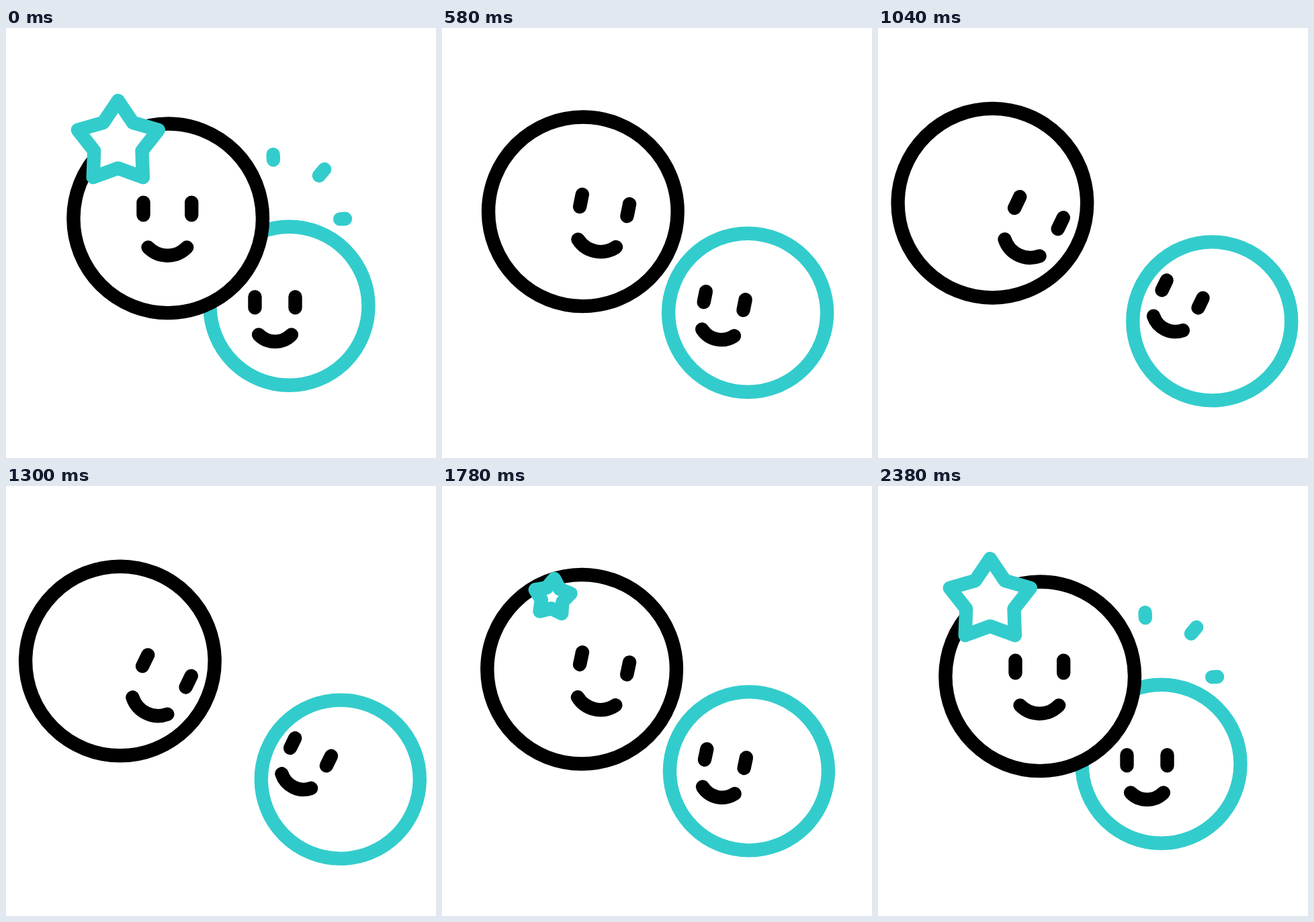
Recreate the animation shown at these times as an HTML page. Size 640 px wide and 640 px high, loop 2400 ms.

```html
<!DOCTYPE html>
<html lang="en">
<head>
<meta charset="utf-8">
<title>Two smiling circles</title>
<style>
  html, body { margin: 0; width: 100%; height: 100%; overflow: hidden; background: #fff; }
  svg { display: block; width: 100%; height: 100%; }
  .line { fill: none; stroke-width: 20.4; stroke-linecap: round; stroke-linejoin: round; }
  .black { stroke: #000; }
  .teal { stroke: #33cccc; }
  .solid { fill: #fff; }
</style>
</head>
<body>
<svg viewBox="0 0 640 640">
  <circle id="smallRing" class="line solid teal" r="118"/>
  <path id="smallFace" class="line black"/>
  <circle id="bigRing" class="line solid black" r="140.8"/>
  <path id="bigFace" class="line black"/>
  <path id="star" class="line solid teal"/>
  <path id="sparks" class="line teal"/>
</svg>
<script>
const LOOP = 2400;
const RAD = Math.PI / 180;
const el = id => document.getElementById(id);
const mix = (a, b, k) => a + (b - a) * k;

// Symmetric cubic-bezier(.75, 0, .25, 1), solved by bisection.
function ease(x) {
  if (x <= 0) return 0;
  if (x >= 1) return 1;
  let lo = 0, hi = 1, s = 0.5;
  for (let i = 0; i < 24; i++) {
    s = (lo + hi) / 2;
    const r = 1 - s;
    const bx = 2.25 * s * r * r + 0.75 * s * s * r + s * s * s;
    if (bx < x) lo = s; else hi = s;
  }
  return s * s * (3 - 2 * s);
}
const span = (t, from, to) => ease((t - from) / (to - from));

// Eyes and mouth around the point midway between the eyes.
function face(gap, eye, drop, half, sag) {
  const r = (half * half + sag * sag) / (2 * sag);
  const eyeAt = x => `M${x} ${-eye}V${eye}`;
  return eyeAt(-gap) + eyeAt(gap) + `M${-half} ${drop}A${r} ${r} 0 0 0 ${half} ${drop}`;
}
el('bigFace').setAttribute('d', face(35.85, 9.3, 57.5, 28.8, 12.2));
el('smallFace').setAttribute('d', face(30, 8.1, 48.2, 24.4, 10.2));

// Star path scaled and turned about its box centre; the line weight stays.
function starPath(scale, turn) {
  const pts = [];
  const c = Math.cos(turn), s = Math.sin(turn);
  for (let i = 0; i < 10; i++) {
    const r = i % 2 ? 37.5 : 63.1;
    const a = i * 36 * RAD;
    const x = r * Math.sin(a) * scale;
    const y = (6 - r * Math.cos(a)) * scale;
    pts.push((166.8 + x * c - y * s).toFixed(2) + ' ' + (165.2 + x * s + y * c).toFixed(2));
  }
  return 'M' + pts.join('L') + 'Z';
}

const sparks = [
  [397.9, 196.2, 397.6, 188.3],
  [465.9, 219.8, 474.1, 210.2],
  [497.2, 284.4, 505, 284]
];
const sparkPath = (a, b) => sparks.map(([x1, y1, x2, y2]) =>
  `M${mix(x1, x2, a)} ${mix(y1, y2, a)}L${mix(x1, x2, b)} ${mix(y1, y2, b)}`).join('');

function place(id, x, y, turn = 0) {
  el(id).setAttribute('transform', `translate(${x} ${y}) rotate(${turn})`);
}

function draw(t) {
  const p = t < 1200 ? span(t, 0, 1200) : 1 - span(t, 1200, 2340);
  const q = p * p;
  place('bigRing', 241.2 - 71.7 * p, 283.3 - 22.9 * p);
  place('smallRing', 421.5 + 76.7 * p, 413.8 + 22.9 * p);
  place('bigFace', 240.35 + 7.8 * p - 8.8 * q, 269 - 25.7 * p + 32.3 * q, 26 * p);
  place('smallFace', 400.5 + 40.3 * p + 13.1 * q, 408.3 + 0.8 * p - 13.4 * q, 26.3 * p);

  const scale = t < 1200 ? 1 - span(t, 0, 550) : span(t, 1480, 2100);
  const turn = 360 * (t < 1200 ? span(t, 0, 1200) : span(t, 1400, 2340));
  el('star').setAttribute('d', scale > 0.005 ? starPath(scale, turn * RAD) : '');

  const gone = span(t, 0, 200), back = span(t, 2100, 2340);
  el('sparks').setAttribute('d',
    gone < 1 ? sparkPath(gone, 1) : back > 0 ? sparkPath(0, back) : '');
}

const start = performance.now();
function tick() {
  draw((performance.now() - start) % LOOP);
  requestAnimationFrame(tick);
}
draw(0);
requestAnimationFrame(tick);
</script>
</body>
</html>
```
